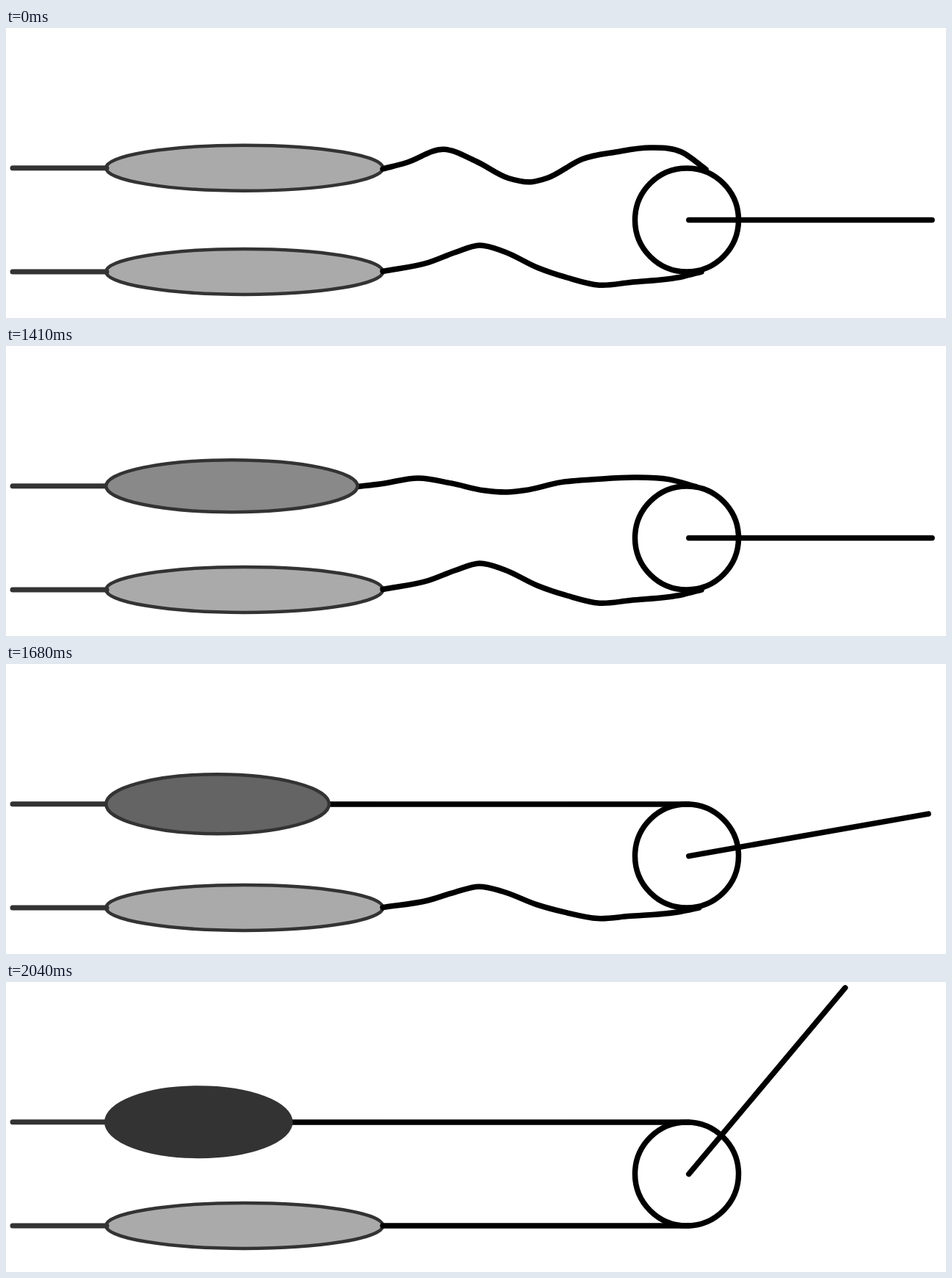
Animation, 1280 px wide and 395 px high, one loop 2.7 s. Source, as an HTML page:

```html
<!DOCTYPE html>
<html lang="en">
<head>
<meta charset="utf-8">
<title>Muscles and joint</title>
<style>
html, body { margin: 0; width: 100%; height: 100%; overflow: hidden; background: #fff; }
svg { display: block; width: 100%; height: 100%; }
path, line, circle { fill: none; stroke: #000; stroke-width: 7.5; stroke-linecap: round; stroke-linejoin: round; }
ellipse { fill: #aaa; stroke: #333; stroke-width: 4.5; }
.bone { stroke: #333; stroke-width: 7; }
</style>
</head>
<body>
<svg viewBox="0 0 1280 395">
  <g id="upper">
    <ellipse id="muscle" cy="190.7"/>
    <line id="bone" class="bone" x1="9" y1="190.8" x2="137" y2="190.8"/>
    <path id="rope1"/>
  </g>
  <ellipse cx="324.7" cy="331.9" rx="188.5" ry="31"/>
  <line class="bone" x1="9" y1="332" x2="137" y2="332"/>
  <path id="rope2"/>
  <circle cx="927" cy="261.5" r="70.5"/>
  <line id="arm" x1="929.8" y1="261.6" x2="1261" y2="261.6"/>
</svg>
<script>
const LOOP = 2700, STEP = 30, START = 1170, TAUT = 1590, END = 2040;
const LEFT = 136.2;
const $ = id => document.getElementById(id);

// Key points of each slack rope; its ends slide by `from` and `to` as it tightens.
const upperRope = {
  y: 191, from: -60, to: -23, ease: 3,
  points: [[513, 192], [545, 183.5], [596, 165.3], [640, 181.5], [684, 204.5], [715, 209.7],
    [738, 204], [785, 178.5], [830, 169], [878, 163], [920, 169], [953, 192.5]]
};
const lowerRope = {
  y: 332, from: 0, to: -17, ease: 1,
  points: [[513, 331.5], [575, 319.5], [612, 305.5], [645, 296], [678, 304.5], [724, 326.5],
    [764, 340], [808, 350.2], [850, 346.5], [922, 338.5], [947, 332]]
};

const ramp = (t, a, b) => Math.min(1, Math.max(0, (t - a) / (b - a)));
const mix = (a, b, k) => a + (b - a) * k;

// Smooth curve through the points, with parabolic slopes.
function smooth(p) {
  const n = p.length - 1;
  const gap = i => p[i + 1][0] - p[i][0];
  const rise = i => (p[i + 1][1] - p[i][1]) / gap(i);
  const slope = i => i === 0 ? rise(0) : i === n ? rise(n - 1)
    : mix(rise(i - 1), rise(i), gap(i - 1) / (gap(i - 1) + gap(i)));
  let d = `M${p[0]}`;
  for (let i = 0; i < n; i++) {
    const h = gap(i) / 3, [x0, y0] = p[i], [x1, y1] = p[i + 1];
    d += `C${x0 + h},${y0 + h * slope(i)} ${x1 - h},${y1 - h * slope(i + 1)} ${x1},${y1}`;
  }
  return d;
}

function tighten({ y, from, to, ease, points }, k) {
  const first = points[0][0], last = points[points.length - 1][0];
  return smooth(points.map(([x, v]) => {
    const along = ((x - first) / (last - first)) ** ease;
    return [x + k * mix(from, to, along), mix(v, y, k)];
  }));
}

function attrs(el, values) {
  for (const name in values) el.setAttribute(name, values[name]);
}

function draw(now) {
  const t = Math.floor((now % LOOP) / STEP + 1e-6) * STEP;
  const squeeze = ramp(t, START, END);
  const pull = ramp(t, START, TAUT);
  const turn = ramp(t, TAUT, END);

  const rx = mix(188.5, 126, squeeze);
  const gray = Math.round(mix(170, 51, squeeze));
  attrs($('muscle'), { cx: LEFT + rx, rx, ry: mix(31, 47.2, squeeze) });
  $('muscle').style.fill = `rgb(${gray},${gray},${gray})`;
  // The muscle covers the line ends once it contracts.
  $('upper').insertBefore($('muscle'), t < START ? $('bone') : null);

  const taut = `M${LEFT + 2 * rx} 191H930`;
  attrs($('rope1'), { d: pull < 1 ? tighten(upperRope, pull) : taut });
  attrs($('rope2'), { d: tighten(lowerRope, turn) });
  attrs($('arm'), { transform: `rotate(${-50 * turn} 929.8 261.6)` });
}

const origin = performance.now();
function tick() {
  draw(performance.now() - origin);
  requestAnimationFrame(tick);
}
tick();
</script>
</body>
</html>
```
